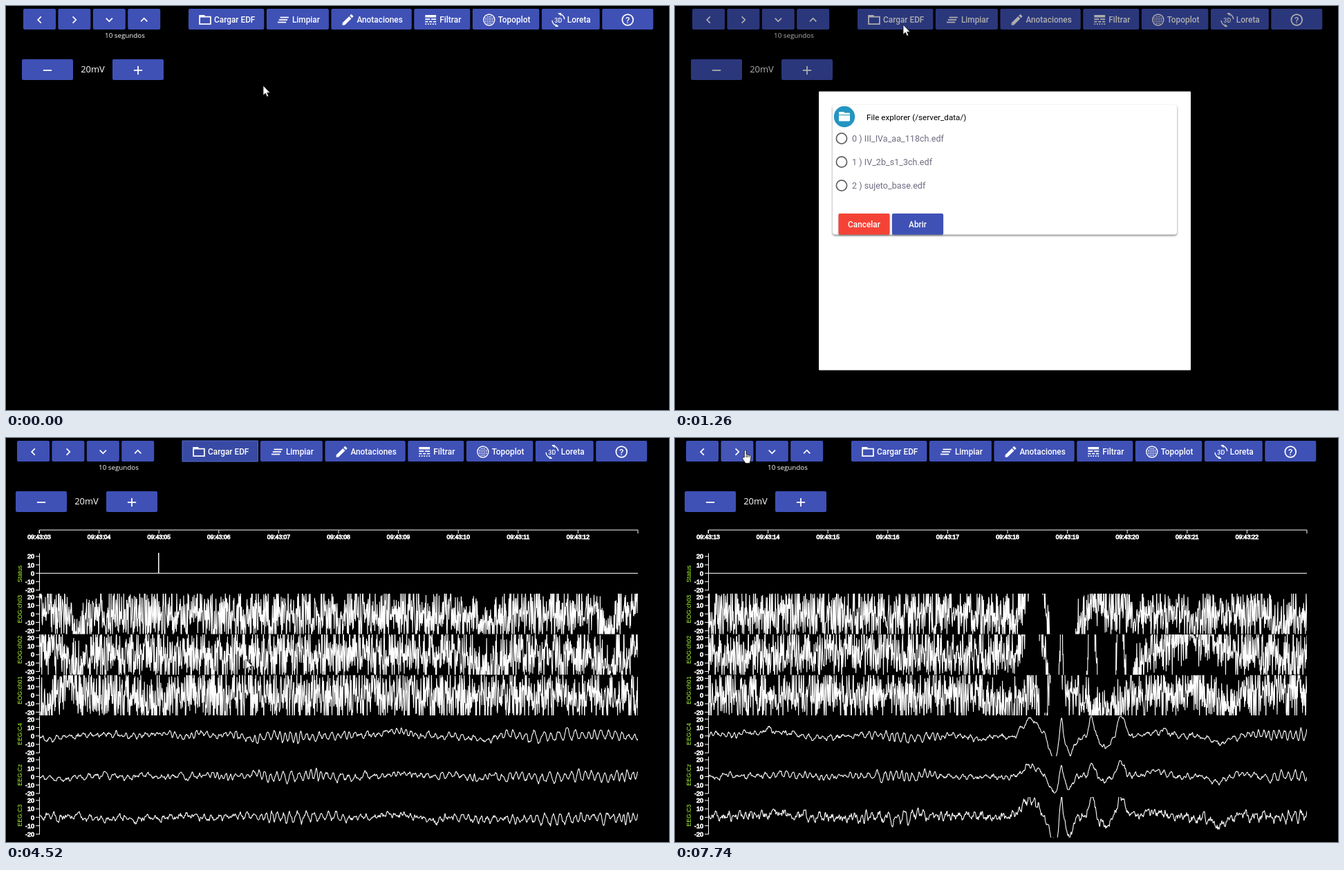
These frames come from a looping animation (959 px wide and 584 px high, 8000 ms). An HTML page with a canvas:

```html
<!DOCTYPE html>
<html lang="es">
<head>
<meta charset="utf-8">
<title>Visor EEG</title>
<style>
html, body { margin: 0; width: 100%; height: 100%; overflow: hidden; background: #000; }
canvas { display: block; }
</style>
</head>
<body>
<canvas id="stage" width="959" height="584"></canvas>
<script>
const g = document.getElementById('stage').getContext('2d');
const LOOP = 8000, BLUE = '#3f51b5', WHITE = '#fff';
const ROBOTO = 'Roboto, sans-serif', OPEN = '"Open Sans", sans-serif', ARIAL = '"Liberation Sans", Arial, sans-serif';
const CAPTION = '500 11.85px ' + ROBOTO;

const ARROW = new Path2D('M0 0V14.2L3.3 11.2L5.5 16.2L7.8 15.2L5.6 10.4H10z');
const HAND = new Path2D('M3.4 11V2.2Q3.4.6 4.7.6Q6 .6 6 2.2V6.6L11.4 7.8Q13 8.4 12.8 10.5L12.2 15L11 19.4H5L1 13.4Q0 11.6 1.2 11z');

// time, shape, x, y
const POINTER = [
  [0, ARROW, 372, 115], [420, ARROW, 330, 29], [830, ARROW, 330, 27], [1640, ARROW, 300, 314],
  [2050, HAND, 236, 222], [2450, ARROW, 329, 282], [2860, HAND, 342, 319], [3690, ARROW, 347, 320],
  [5730, ARROW, 249, 150], [6130, ARROW, 117, 52], [6520, HAND, 98, 17], [7740, HAND, 97, 17]
];

function text(s, x, y, font, color = WHITE, align = 'left') {
  g.font = font;
  g.fillStyle = color;
  g.textAlign = align;
  g.fillText(s, x, y);
}
function box(x, y, w, h, r, color) {
  g.fillStyle = color;
  g.beginPath();
  g.roundRect(x, y, w, h, r);
  g.fill();
}
function bar(x, y, w, h) {
  g.fillStyle = WHITE;
  g.fillRect(x, y, w, h);
}
function ring(x, y, r, color, width, a = 0, b = 7) {
  g.strokeStyle = color;
  g.lineWidth = width;
  g.beginPath();
  g.arc(x, y, r, a, b);
  g.stroke();
}
function disc(x, y, r, color) {
  g.fillStyle = color;
  g.beginPath();
  g.arc(x, y, r, 0, 7);
  g.fill();
}
function line(color, width, ...p) {
  g.strokeStyle = color;
  g.lineWidth = width;
  g.beginPath();
  for (let i = 0; i < p.length; i += 2) g.lineTo(p[i], p[i + 1]);
  g.stroke();
}
function at(x, y, paint, angle = 0) {
  g.save();
  g.translate(x, y);
  g.rotate(angle);
  paint();
  g.restore();
}
function shadow(blur, dy, alpha) {
  g.shadowColor = `rgba(0,0,0,${alpha})`;
  g.shadowBlur = blur;
  g.shadowOffsetY = dy;
}

// Icons, drawn around the origin
const T = 1.75;
const chevron = () => line(WHITE, T, 2.3, -4.6, -2.3, 0, 2.3, 4.6);
const turned = angle => () => at(0, 0, chevron, angle);
const minus = () => bar(-7 * T / 2, -T / 2, 7 * T, T);
const plus = () => { minus(); at(0, 0, minus, Math.PI / 2); };
function folder() {
  g.strokeStyle = WHITE;
  g.lineWidth = T;
  g.strokeRect(-7.9, -4.4, 15.8, 10.5);
  bar(-8.7, -7, 8.2, 2.6);
}
function clear() {
  for (let i = -1; i <= 1; i++) at(-i * T, i * 2 * T, minus);
}
function pencil() {
  at(0, 0, () => {
    bar(-8.8, -2.3, 13.7, 4.6);
    bar(6.2, -2.3, 3.2, 4.6);
    g.beginPath();
    g.moveTo(-11.1, 0);
    g.lineTo(-8.8, -2.3);
    g.lineTo(-8.8, 2.3);
    g.fill();
  }, -Math.PI / 4);
}
function dashes() {
  [1, 2, 3, 5].forEach((n, row) => {
    const w = (9 * T - (n - 1) * T) / n;
    for (let i = 0; i < n; i++) bar(-4.5 * T + i * (w + T), row ? 2 * T * row - 3 * T : -4 * T, w, row ? T : 2 * T);
  });
}
function grid() {
  ring(0, 0, 8, WHITE, 1.4);
  for (let i = -2; i <= 2; i++) for (let j = -2; j <= 2; j++)
    if (Math.abs(i) + Math.abs(j) < 4) disc(i * 2.5, j * 2.5, .85, WHITE);
}
function spin() {
  text('3D', 0, 3.5, '500 9px ' + ROBOTO, WHITE, 'center');
  for (const angle of [0, Math.PI]) at(0, 0, () => {
    ring(0, 0, 9, WHITE, 1.4, -1.5, -.1);
    line(WHITE, 1, 4, -6, 0, -9.5, 4, -9.5);
  }, angle);
}
function help() {
  ring(0, 0, 7.9, WHITE, T);
  text('?', 0, 4.6, '500 13px ' + ROBOTO, WHITE, 'center');
}

// Buttons: captioned ones are as wide as their text plus icon and padding
const buttons = [turned(0), turned(Math.PI), turned(-Math.PI / 2), turned(Math.PI / 2)]
  .map((icon, i) => ({ x: 25 + 50.4 * i, y: 4, w: 47, icon }));
const next = buttons[1];
buttons.push({ x: 23, y: 77, w: 74, icon: minus }, { x: 154, y: 77, w: 74, icon: plus });
const menu = [[folder, 'Cargar EDF'], [clear, 'Limpiar'], [pencil, 'Anotaciones'], [dashes, 'Filtrar'],
  [grid, 'Topoplot'], [spin, 'Loreta'], [help, '']].map(([icon, caption]) => ({ icon, caption, y: 4 }));
const load = menu[0];
buttons.push(...menu);

function layMenu() {
  let x = 264;
  g.font = CAPTION;
  for (const b of menu) {
    b.x = x;
    b.w = b.caption ? g.measureText(b.caption).width + 50 : 74;
    x += b.w + 3.5;
  }
}

function toolbar(t) {
  layMenu();
  for (const b of buttons) {
    const { x, y, w, icon, caption } = b;
    box(x, y, w, 30, 2, BLUE);
    if (b === load && t >= 830 && t < 1260) glow(b, 'rgba(255,255,255,.12)');
    if (b === load && t >= 3690 && t < 6950) glow(b, 'rgba(20,30,60,.14)', '#526cc9');
    if (b === next && t >= 6950) glow(b, 'rgba(255,255,255,.03)', t < 7330 && '#627ddc');
    at(caption ? x + 24 : x + w / 2, y + 16, icon);
    if (caption) text(caption, x + 37, 23.5, CAPTION);
  }
  text('10 segundos', 172, 46, '9.8px ' + OPEN, WHITE, 'center');
  text('20mV', 125.5, 96, '13px ' + OPEN, WHITE, 'center');
}
function glow({ x, y, w }, fill, border) {
  box(x, y, w, 30, 2, fill);
  if (!border) return;
  g.strokeStyle = border;
  g.lineWidth = 1;
  g.strokeRect(x, y, w, 30);
}

// Traces: seeded noise over a drift made of bumps [x, width, height]
const LEFT = 48, WIDTH = 866, UNIT = 1.22;
const zero = row => 195.5 + 58.8 * row;
const drift = (bumps, x) => bumps.reduce((sum, [c, w, h]) => sum + h * Math.exp(-(((x - c) / w) ** 2)), 0);

function random(seed) {
  return () => {
    seed = seed + 0x6D2B79F5 | 0;
    let t = Math.imul(seed ^ seed >>> 15, 1 | seed);
    t = t + Math.imul(t ^ t >>> 7, 61 | t) ^ t;
    return ((t ^ t >>> 14) >>> 0) / 4294967296;
  };
}
function trace(row, count, value) {
  const path = new Path2D();
  for (let i = 0; i <= count; i++) {
    const x = LEFT + WIDTH * i / count;
    path.lineTo(x, zero(row) - UNIT * value(x));
  }
  return path;
}
function eye(row, bumps) {
  const r = random(row * 7 + bumps.length);
  return trace(row, 1650, x => drift(bumps, x) + (r() + r() + r() - 1.5) * 33);
}
function brain(row, bumps, scale, rough, bursts) {
  const r = random(row * 5 + bumps.length);
  let slow = 0, fast = 0, wobble = 0, phase = row;
  return trace(row, 1000, x => {
    slow = slow * .94 + (r() - .5) * 1.8;
    fast = fast * .5 + (r() - .5) * rough;
    wobble = wobble * .95 + (r() - .5) * .12;
    phase += .6 + wobble;
    const burst = .5 + drift(bursts, x);
    return drift(bumps, x) * scale + Math.sin(phase) * burst * (3 + 9 * Math.abs(wobble)) + slow + fast;
  });
}

const calm = [[565, 30, 5], [690, 25, -4]];
const blinks = [[130, 50, 5], [514, 14, 20], [548, 9, -27], [559, 3, 30], [571, 7, -20], [603, 5, 22],
  [622, 10, -11], [645, 7, 24], [700, 25, 5], [786, 14, -9]];
const alphaA = [[420, 70, 1], [830, 130, 1]], alphaB = [[325, 50, .9], [900, 50, 1]];
const PAGES = [[
  eye(1, [[48, 30, 16], [105, 14, -22], [700, 14, -12], [872, 14, -19], [914, 18, 14]]),
  eye(2, [[48, 30, 12], [103, 14, -21], [700, 26, -18], [875, 16, -14], [914, 12, 16]]),
  eye(3, [[48, 14, -18], [88, 12, 17], [205, 40, -8], [266, 14, 11]]),
  brain(4, calm, 1, 3.5, alphaA), brain(5, calm, .5, 3.5, alphaA), brain(6, calm, .7, 5, alphaA)
], [
  eye(1, [[490, 10, -8], [523, 16, 75], [560, 22, -95], [610, 30, 12], [752, 6, -14], [875, 14, -17]]),
  eye(2, [[290, 50, 9], [518, 14, 90], [570, 30, -95], [635, 30, -95], [559, 3, 130], [603, 6, 170], [644, 7, 170], [745, 50, 20], [893, 14, -12]]),
  eye(3, [[480, 30, -13], [512, 5, 22], [533, 6, -65], [551, 10, 85], [620, 28, -20], [750, 15, 11], [800, 18, -13], [865, 20, 9]]),
  brain(4, blinks, 1, 3.5, alphaB), brain(5, blinks, .65, 3.5, alphaB), brain(6, blinks, 1.05, 8, alphaB)
]];
const CHANNELS = ['Status', 'EOG:ch03', 'EOG:ch02', 'EOG:ch01', 'EEG:C4', 'EEG:Cz', 'EEG:C3'];

function label(s, x, y, size, align) {
  text(s, x, y, size + 'px ' + ARIAL, WHITE, align);
  g.strokeStyle = WHITE;
  g.lineWidth = .85;
  g.strokeText(s, x, y);
}
function chart(page) {
  const right = LEFT + WIDTH;
  line(WHITE, 1, LEFT + .5, 138, LEFT + .5, 133, right, 133, right, 138);
  for (let i = 0; i < 10; i++) {
    const x = LEFT + WIDTH / 10 * i;
    line(WHITE, 1, x, 133, x, 138);
    label('09:43:' + String(3 + 10 * page + i).padStart(2, '0'), x, 146, 8.6, 'center');
  }
  CHANNELS.forEach((name, row) => {
    const z = zero(row);
    line(WHITE, 1, LEFT + .5, z - 29, LEFT + .5, z + 25);
    for (let v = -20; v <= 20; v += 10) {
      line(WHITE, 1, 43, z - v * UNIT, LEFT, z - v * UNIT);
      label(v, 41, z - v * UNIT + 3.2, 9, 'right');
    }
    at(23, z + 13.2, () => text(name, 0, 0, '8.7px ' + ARIAL, '#adff2f'), -Math.PI / 2);
    if (!row) {
      line(WHITE, 1, LEFT, z, right, z);
      if (!page) line(WHITE, 1.5, 220.8, z, 220.8, 166);
      return;
    }
    g.save();
    g.beginPath();
    g.rect(LEFT, z - 29.2, WIDTH, 58.4);
    g.clip();
    g.strokeStyle = WHITE;
    g.lineWidth = 1.1;
    g.lineJoin = 'bevel';
    g.stroke(PAGES[page][row - 1]);
    g.restore();
  });
}

function tip(x, y, w, h, s, size) {
  box(x, y, w, h, 1, '#4c4c4c');
  text(s, x + w / 2, y + h / 2 + size * .35, size + 'px ' + ROBOTO, WHITE, 'center');
}

function dialog(t) {
  const opening = t < 1260;
  g.save();
  if (opening) {
    g.translate(477, 362.5);
    g.scale(.963, .963);
    g.translate(-477, -325);
  }
  box(208, 123.5, 538, 403, 1, WHITE);
  g.save();
  shadow(3, 1.5, .5);
  box(228, 143, 498, 187.5, 4, WHITE);
  g.restore();
  disc(245, 160, 15.2, '#2495c0');
  box(237, 153, 8, 5, 1, WHITE);
  box(237, 154.5, 16, 12, 1, WHITE);
  line('#2495c0', 1, 236.5, 157.5, 254, 157.5);
  text('File explorer (/server_data/)', 277, 164.5, '11.7px ' + ROBOTO, '#000');
  ['III_IVa_aa_118ch', 'IV_2b_s1_3ch', 'sujeto_base'].forEach((file, i) => {
    const y = 191.5 + 34 * i, on = i === 1 && t >= 2050;
    if (on && t < 2450) disc(241, y, 20, 'rgba(255,64,129,.2)');
    ring(241, y, 7.6, on ? '#ff4081' : '#666', 1.8);
    if (on) disc(241, y, 4.4, '#ff4081');
    text(`${i} ) ${file}.edf`, 256, y + 4.5, '12.6px ' + ROBOTO, '#6d6d82');
  });
  const action = (x, color, caption) => {
    g.save();
    shadow(2, 1, .35);
    box(x, 300, 74, 30.5, 2, color);
    g.restore();
    text(caption, x + 37, 319.5, CAPTION, WHITE, 'center');
  };
  action(236.5, '#f44336', 'Cancelar');
  action(314, opening ? '#8d97d2' : BLUE, 'Abrir');
  if (opening) box(208, 123.5, 538, 403, 0, 'rgba(0,0,0,.38)');
  g.restore();
}

function draw(t) {
  g.fillStyle = '#000';
  g.fillRect(0, 0, 959, 584);
  const loaded = t >= 4520;
  at(loaded ? -9 : 0, 0, () => toolbar(t));
  if (loaded) chart(t < 7330 ? 0 : 1);
  if (t >= 830 && t < 3690) {
    g.fillStyle = `rgba(0,0,0,${t < 1260 ? .17 : .32})`;
    g.fillRect(0, 0, 959, 584);
    dialog(t);
  }
  if (t >= 830 && t < 1260) tip(289, 46, 60, 13.5, 'Cargar paciente (.EDF)', 5);
  if (t >= 6950 && t < 7330) tip(83, 45, 14, 5, 'Avanzar', 3);

  const [, path, x, y] = POINTER.findLast(p => p[0] <= t);
  at(x, y, () => {
    g.fillStyle = WHITE;
    g.fill(path);
    g.strokeStyle = '#000';
    g.lineWidth = .7;
    g.stroke(path);
    if (path === HAND) for (const fx of [6, 8, 10.3]) line('#000', .8, fx, 7.5, fx, 11);
  });
}

function tick() {
  draw(performance.now() % LOOP);
  requestAnimationFrame(tick);
}
tick();
</script>
</body>
</html>
```
